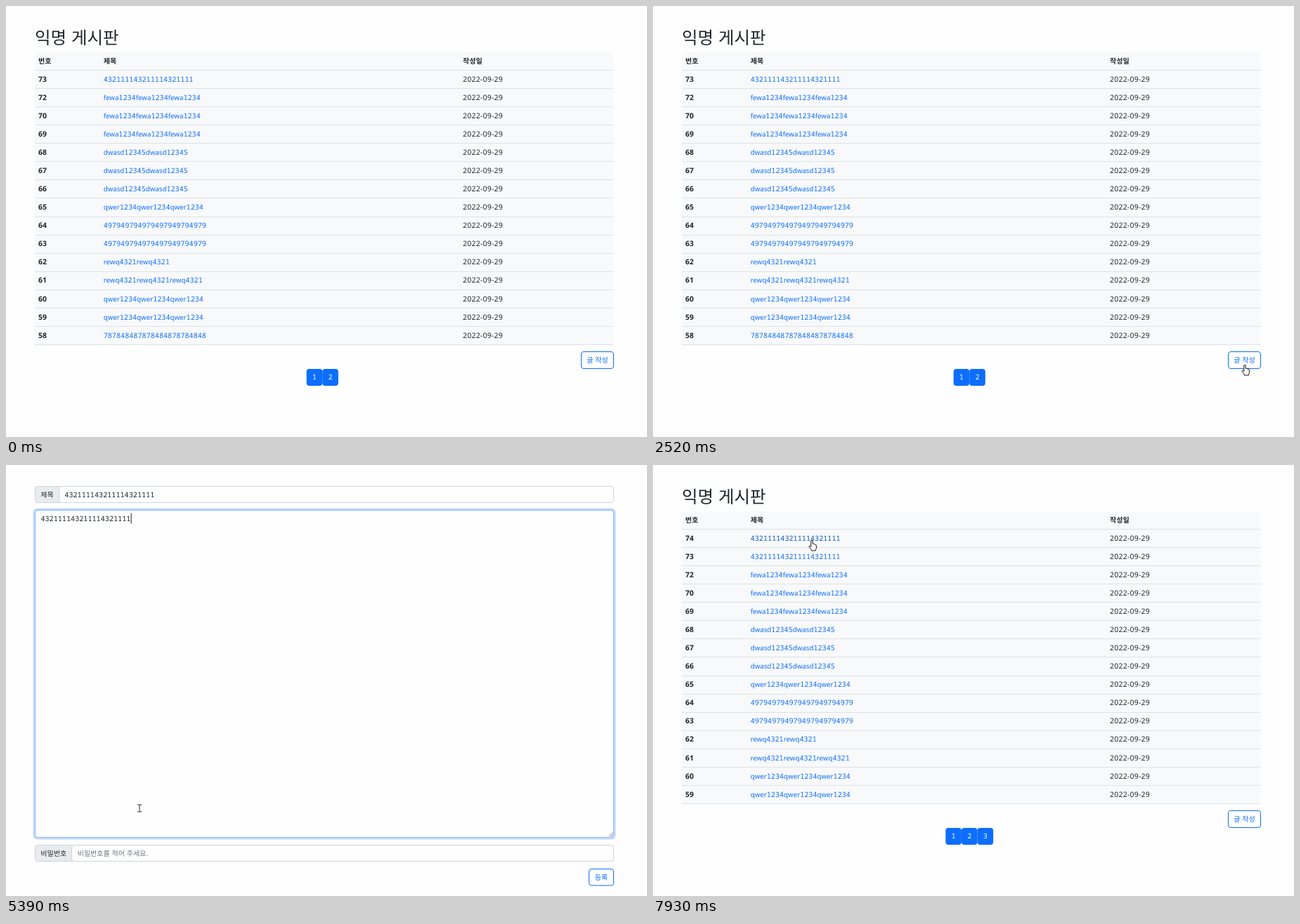
These frames come from a looping animation (912x614 px, 8000 ms). An HTML page:

```html
<!DOCTYPE html>
<html lang="ko">
<head>
<meta charset="utf-8">
<title>익명 게시판</title>
<style>
  html, body { margin: 0; width: 912px; height: 614px; overflow: hidden; background: #fefefe; }
  svg { display: block; }
  text { font: 10px "Noto Sans CJK KR", "Noto Sans", sans-serif; fill: #212529; text-rendering: geometricPrecision; white-space: pre; }
  .head { font-size: 24.5px; font-weight: 300; }
  .bold { font-weight: 700; }
  .num { font: 600 10.4px "Noto Sans", sans-serif; letter-spacing: .15px; }
  .date { font: 10.4px "Noto Sans", sans-serif; letter-spacing: .27px; }
  .mono { font: 10.16px "Noto Sans Mono", monospace; }
  .mono tspan { font: 9.7px "Noto Sans", sans-serif; }
  .link { fill: #0d6efd; }
  .hot { fill: #0a58ca; }
  .white { fill: #fff; }
  .hint { fill: #6c757d; }
  .mid { text-anchor: middle; }
</style>
</head>
<body>
<svg id="stage" width="912" height="614" viewBox="0 0 912 614"></svg>
<script>
const LOOP = 8000, BLUE = '#0d6efd', ENTRY = '4321111';
const stage = document.getElementById('stage');

// [number, repeated word, repeat count]
const firstPage = [
  [73, ENTRY, 3], [72, 'fewa1234', 3], [70, 'fewa1234', 3], [69, 'fewa1234', 3],
  [68, 'dwasd12345', 2], [67, 'dwasd12345', 2], [66, 'dwasd12345', 2],
  [65, 'qwer1234', 3], [64, '4979', 6], [63, '4979', 6], [62, 'rewq4321', 2],
  [61, 'rewq4321', 3], [60, 'qwer1234', 3], [59, 'qwer1234', 3], [58, '78784848', 3]
];
const secondPage = [
  ['4979', 6], ['4979', 6], ['51', 12], ['51', 8], ['51', 8], ['51', 8], ['16', 8], ['16', 8],
  ['15', 10], ['15', 10], ['1233', 4], ['1233', 1], ['15', 2], ['12', 2], ['32', 2]
].map((post, i) => [57 - i, ...post]);
const updatedPage = [[74, ENTRY, 3], ...firstPage.slice(0, 14)];

// [time, x, y]
const path = [
  [160, 853, 606], [850, 462, 529], [1300, 462, 529], [1600, 436, 529], [1850, 436, 529],
  [2500, 842, 511], [2950, 842, 511], [3400, 180, 42], [3500, 180, 42], [3700, 180, 83],
  [5120, 180, 83], [5390, 190, 489], [5560, 190, 551], [5900, 190, 551], [6310, 301, 506],
  [6680, 847, 589], [6950, 847, 589], [7460, 582, 445], [7850, 226, 107], [8000, 226, 107]
];

// Typing bursts: [start, duration, characters]
const fields = {
  title: { box: [75.5, 30.5, 789, 23], focus: [3460, 4620], bursts: [[3500, 280, 7], [4260, 300, 14]] },
  body: { box: [41.5, 64.5, 823, 466], focus: [4620, 5860], bursts: [[4700, 270, 7], [5040, 300, 14]] },
  password: { box: [93.5, 541.5, 771, 23], focus: [5860, 6790], bursts: [[5950, 300, 7]] }
};

const cursors = {
  arrow: '<path d="M0 0V11L2.6 8.6 4.3 12.3 6 11.5 4.4 8H8Z" fill="#fff" stroke="#000" stroke-width=".8"/>',
  hand: '<path d="M-1.2 1Q0-.6 1.2 1V5.3Q2.4 4.6 3 5.8 4.6 5.3 4.9 6.6 6.4 6.2 6.4 7.8V11Q6.4 12.5 5.4 13.3V15H-.6V13.6L-4 9.6Q-4.2 8-2.6 8.3L-1.2 9.6Z" fill="#fff" stroke="#000" stroke-width=".9"/>',
  beam: '<path d="M-3-5H-.6L0-4.5.6-5H3M0-4.5V4.5M-3 5H-.6L0 4.5.6 5H3" fill="none" stroke="#222"/>'
};

const ramp = (t, start, length = 150) => Math.min(1, Math.max(0, (t - start) / length));
const during = (t, from, to) => ramp(t, from) - ramp(t, to);
const text = (s, x, y, cls = '', extra = '') => `<text class="${cls}" x="${x}" y="${y}" ${extra}>${s}</text>`;
const mono = (s, x, y, cls = '') => text(s.replace(/[a-z]+/g, '<tspan>$&</tspan>'), x, y, 'mono ' + cls);
const rect = (x, y, w, h, style) => `<rect x="${x}" y="${y}" width="${w}" height="${h}" ${style}/>`;
const inside = (x, y, [left, top, w, h]) => x >= left && x <= left + w && y >= top && y <= top + h;

function outlineButton(label, [x, y, w, h], hover) {
  const cx = x + w / 2, base = y + h / 2 + 3.8;
  return rect(x, y, w, h, `rx="3.5" fill="${BLUE}" fill-opacity="${hover}" stroke="${BLUE}"`) +
    text(label, cx, base, 'mid link') + text(label, cx, base, 'mid white', `opacity="${hover}"`);
}

const writeButton = [818.5, 492.5, 46, 24], submitButton = [829.5, 575.5, 35, 23.5];
const pager = [416, 517, 68, 24], newestLink = [139, 97, 128, 14];

function list(t, posts, pages) {
  let out = text('익명 게시판', 41, 54, 'head') + rect(41, 66, 823.5, 416.5, 'fill="#f8f9fa"') +
    text('번호', 46, 81.8, 'bold') + text('제목', 138.7, 81.8, 'bold') + text('작성일', 650, 81.8, 'bold');
  const hovered = t > 7820;
  for (let i = 0; i <= posts.length; i++)
    out += rect(41, Math.round(91 + i * 26.07), 823.5, 1, 'fill="#dee2e6"');
  posts.forEach(([number, word, count], i) => {
    const y = 107.7 + i * 26.07;
    out += text(number, 46, y, 'num') +
      mono(word.repeat(count), 138.7, y, hovered && i === 0 ? 'hot' : 'link') +
      text('2022-09-29', 650, y, 'date');
  });
  out += outlineButton('글 작성', writeButton, during(t, 2530, 2900));
  const hovers = [during(t, 1480, 1860), during(t, 780, 1420), 0];
  for (let i = 0; i < pages; i++) {
    const x = 450.2 - pages * 11.3 + i * 22.6;
    out += rect(x, 517, 22.6, 24, `rx="4" fill="${BLUE}"`) +
      rect(x, 517, 22.6, 24, `rx="4" fill="#0b5ed7" opacity="${hovers[i]}"`) +
      mono(String(i + 1), x + 11.3, 532.3, 'mid white');
  }
  return out;
}

function typedCount(t, { bursts }) {
  return bursts.reduce((n, [start, length, chars]) => n + Math.floor(chars * ramp(t, start, length)), 0);
}

function caret(t, { focus, bursts }, x, y) {
  const started = bursts.filter(([start]) => start <= t).pop();
  const idle = started ? t - started[0] - started[1] : 0;
  return t >= focus[0] && t < focus[1] && idle < 450 ? rect(x, y - 7.5, 1, 15, 'fill="#212529"') : '';
}

function fieldBox(t, { box: [x, y, w, h], focus }) {
  const glow = during(t, ...focus);
  return rect(x, y, w, h, 'rx="3.5" fill="#fefefe" stroke="#ced4da"') +
    `<g opacity="${glow}" fill="none">` + rect(x, y, w, h, 'rx="3.5" stroke="#86b7fe"') +
    rect(x - 1.75, y - 1.75, w + 3.5, h + 3.5, `rx="5" stroke="${BLUE}" stroke-opacity=".25" stroke-width="2.5"`) + '</g>';
}

function form(t) {
  const { title, body, password } = fields;
  const label = (s, y, w) => rect(41.5, y, w, 23, 'rx="3.5" fill="#e9ecef" stroke="#ced4da"') + text(s, 49.3, y + 15.3);
  const full = ENTRY.repeat(3);
  const [titleLength, bodyLength, dots] = [title, body, password].map(field => typedCount(t, field));
  return label('제목', 30.5, 37) + label('비밀번호', 541.5, 55) +
    fieldBox(t, body) + fieldBox(t, title) + fieldBox(t, password) +
    mono(full.slice(0, titleLength), 83.3, 45.6) + caret(t, title, 83.5 + titleLength * 6.1, 42) +
    mono(full.slice(0, bodyLength), 49.4, 79.7) + caret(t, body, 49.5 + bodyLength * 6.1, 76) +
    (dots ? text('•'.repeat(dots), 102, 556.8, 'date', 'style="letter-spacing:.05px"')
          : text('비밀번호를 적어 주세요.', 101.7, 556.8, 'hint')) +
    caret(t, password, 101.7 + dots * 4, 553) +
    '<path d="M858 529L863.5 523.5M861 529L863.5 526.5" stroke="#555" stroke-width=".8"/>' +
    outlineButton('등록', submitButton, during(t, 6620, 7200));
}

function pointer(t, onForm) {
  if (t < path[0][0]) return '';
  const next = Math.max(1, path.findIndex(([time]) => time > t));
  const [t0, x0, y0] = path[next - 1], [t1, x1, y1] = path[next];
  const p = ramp(t, t0, t1 - t0), eased = p * p * (3 - 2 * p);
  const x = x0 + (x1 - x0) * eased, y = y0 + (y1 - y0) * eased;
  const over = box => inside(x, y, box);
  const links = onForm ? [submitButton] : [writeButton, pager, newestLink];
  const kind = links.some(over) ? 'hand'
    : onForm && Object.values(fields).some(field => over(field.box)) ? 'beam' : 'arrow';
  return `<g transform="translate(${x.toFixed(1)} ${y.toFixed(1)})">${cursors[kind]}</g>`;
}

function draw(t) {
  const onForm = t >= 2800 && t < 6920;
  const screen = onForm ? form(t)
    : t >= 6920 ? list(t, updatedPage, 3)
    : list(t, t >= 1000 && t < 1840 ? secondPage : firstPage, 2);
  stage.innerHTML = screen + pointer(t, onForm);
}

const began = performance.now();
function tick() {
  draw((performance.now() - began) % LOOP);
  requestAnimationFrame(tick);
}
tick();
</script>
</body>
</html>
```
